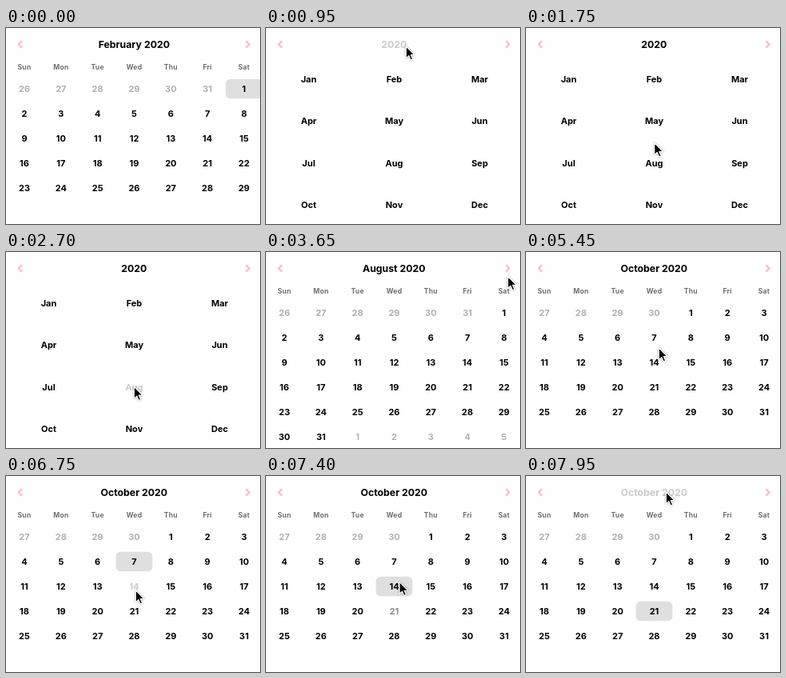
An HTML page that plays this animation: 318 px wide and 245 px high, repeating every 8 s.

```html
<!DOCTYPE html>
<html lang="en">
<head>
<meta charset="utf-8">
<title>Calendar picker</title>
<style>
  html, body { margin: 0; width: 100%; height: 100%; overflow: hidden; background: #fefefe; }
  svg { display: block; width: 100%; height: 100%; }
  text { font-family: Inter, "Liberation Sans", sans-serif; font-weight: 700; text-anchor: middle; }
  .week { letter-spacing: .2px; }
  .pointer { filter: drop-shadow(0 .8px .8px #0006); }
</style>
</head>
<body>
<svg id="stage" viewBox="0 0 318 245"></svg>
<script>
const LOOP = 8000, FADE = 250, PICK_LAG = 450, ENTER = 50;
const MONTHS = ['January', 'February', 'March', 'April', 'May', 'June', 'July',
  'August', 'September', 'October', 'November', 'December'];
const SHORT = MONTHS.map(m => m.slice(0, 3));
const WEEK = ['Sun', 'Mon', 'Tue', 'Wed', 'Thu', 'Fri', 'Sat'];

// Numbers as names are days of the month
const CLICKS = [
  { on: 'title', press: 750, release: 950 },
  { on: 'Aug', press: 2400, release: 2900 },
  { on: 'next', press: 4050, release: 4300 },
  { on: 'next', press: 4800, release: 5100 },
  { on: 7, press: 5850, release: 6200 },
  { on: 14, press: 6650, release: 6850 },
  { on: 21, press: 7050, release: 7300 },
  { on: 'title', press: 7950, release: 8150 }
];
// Pointer moves: [depart, arrive, x, y]
const MOVES = [
  [50, 350, 177, 30], [500, 600, 175, 22], [1550, 1890, 160, 167.5], [3050, 3850, 303, 20.5],
  [5100, 5450, 166, 119], [5600, 5800, 161, 107], [6200, 6500, 162, 142],
  [6850, 7050, 161, 166], [7350, 7750, 175, 19]
];

const clamp = p => Math.min(1, Math.max(0, p));
const easeInOut = p => p < .5 ? 2 * p * p : 1 - 2 * (1 - p) ** 2;
const easeOut = (p, power) => 1 - (1 - p) ** power;

// What the clicks so far have led to; month -1 is the year view
function stateAt(t) {
  let month = 1, pick = 1;
  for (const { on, release } of CLICKS) {
    if (typeof on === 'number') {
      if (t >= release + PICK_LAG) pick = on;
    } else if (t >= release) {
      month = on === 'next' ? month + 1 : SHORT.indexOf(on);
      pick = 0;
    }
  }
  return { month, pick };
}

function opacity(name, t) {
  const click = CLICKS.filter(c => c.on === name && c.press <= t).pop();
  return click ? .2 + .8 * easeInOut(clamp((t - click.release) / FADE)) : 1;
}

// y is the middle of the capitals
function label(str, x, y, size, fill = '#000', alpha = 1, cls = '') {
  return `<text class="${cls}" x="${x}" y="${y + size * .364}" font-size="${size}"
    fill="${fill}" opacity="${alpha}">${str}</text>`;
}

function chevron(x, dir, alpha) {
  return `<path d="M${x} 16.3l${4 * dir} 4.2l${-4 * dir} 4.2" fill="none" stroke="#fbbfcb"
    stroke-width="2.5" opacity="${alpha}"/>`;
}

function yearView(t) {
  return SHORT.map((name, i) => label(name, 53.5 + i % 3 * 107,
    64 + Math.floor(i / 3) * 52.4, 11, '#000', opacity(name, t))).join('');
}

function monthView(month, pick, t) {
  const first = new Date(2020, month, 1).getDay();
  const count = new Date(2020, month + 1, 0).getDate();
  const cells = Math.ceil((first + count) / 7) * 7;
  const colX = i => 23 + i * 45.83;
  let out = WEEK.map((d, i) => label(d, colX(i), 49.2, 8.6, '#707070', 1, 'week')).join('');
  for (let i = 0; i < cells; i++) {
    const n = i - first + 1, inside = n > 0 && n <= count;
    const x = colX(i % 7), y = 76 + Math.floor(i / 7) * 31;
    if (n === pick && inside)
      out += `<rect x="${x - 22.9}" y="${y - 12.3}" width="45.8" height="24.6" rx="6" fill="#dfdfdf"/>`;
    out += label(new Date(2020, month, n).getDate(), x, y, 11,
      inside ? '#000' : '#b0b0b0', inside ? opacity(n, t) : 1);
  }
  return out;
}

function pointer(t) {
  if (t < ENTER) return '';
  let x = 292, y = 4;
  for (const [depart, arrive, toX, toY] of MOVES) {
    const p = clamp((t - depart) / (arrive - depart));
    x += (toX - x) * easeOut(p, 4);
    y += (toY - y) * easeOut(p, 2);
  }
  return `<path class="pointer" transform="translate(${x} ${y})" stroke="#fff" stroke-width="1.2"
    stroke-linejoin="round" d="M.3 .8V15.9L3.8 12.6L6.1 18.1L8.7 17L6.4 11.7H11.3Z"/>`;
}

const stage = document.getElementById('stage');

function draw(now) {
  const t = now % LOOP, { month, pick } = stateAt(t);
  const inYear = month < 0;
  const title = inYear ? '2020' : MONTHS[month] + ' 2020';
  stage.innerHTML = chevron(20, -1, 1) + chevron(300.5, 1, opacity('next', t)) +
    label(title, 160.3, 20.5, 12.3, '#000', opacity('title', t)) +
    (inYear ? yearView(t) : monthView(month, pick, t)) + pointer(t);
}

let start;
function tick(now) {
  start ??= now;
  draw(now - start);
  requestAnimationFrame(tick);
}
draw(0);
requestAnimationFrame(tick);
</script>
</body>
</html>
```
